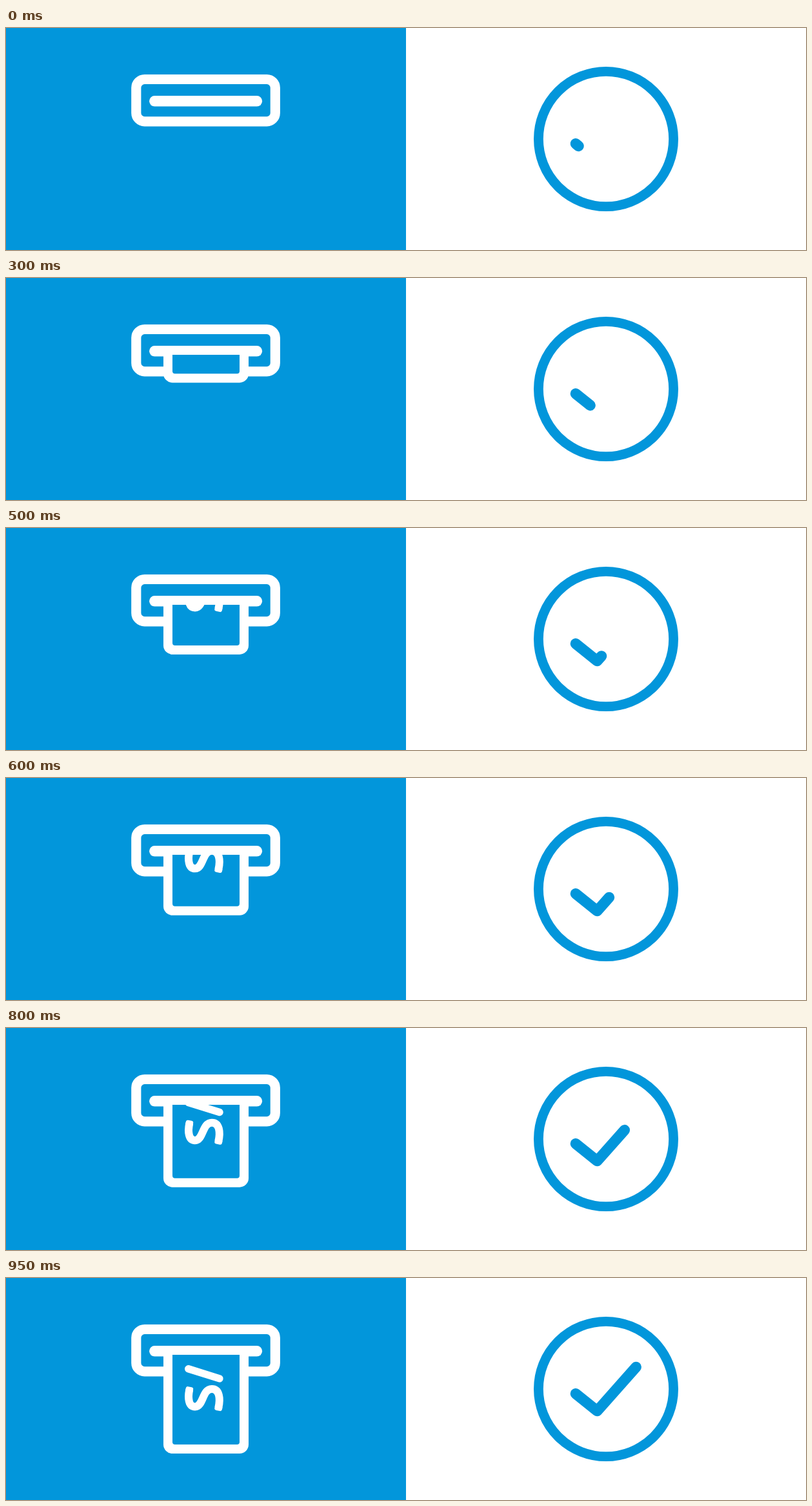
Recreate the animation shown at these times as an HTML page. Size 1240x344 px, loop 1750 ms.

```html
<!DOCTYPE html>
<html lang="en">
<head>
<meta charset="utf-8">
<title>Cash and check</title>
<style>
  html, body { margin: 0; width: 100%; height: 100%; overflow: hidden; background: #fff; }
  svg { display: block; width: 100%; height: 100%; }
  .line { fill: none; stroke-linecap: round; stroke-linejoin: round; }
  .white { stroke: #fff; }
  .blue { stroke: #0296db; }
</style>
</head>
<body>
<svg viewBox="0 0 1240 344">
  <defs>
    <clipPath id="slot"><rect x="200" y="119" width="220" height="225"/></clipPath>
  </defs>
  <rect width="620" height="344" fill="#0296db"/>

  <rect class="line white" x="201.8" y="79.5" width="215.5" height="65.3" rx="13" stroke-width="15.2"/>
  <path class="line white" d="M230.4 113.3H388.8" stroke-width="16.6"/>

  <!-- banknote, drawn fully dispensed -->
  <g clip-path="url(#slot)">
    <g id="note">
      <rect x="244" y="-60" width="132" height="332" rx="14" fill="#fff"/>
      <rect x="258" y="-60" width="104" height="318" rx="4" fill="#0296db"/>
      <path class="line white" d="M282.7 140.8L331 155.9" stroke-width="11.4"/>
      <path class="line white" style="stroke-linecap:butt" stroke-width="12"
        d="M284.3 173C281.5 186 283 199.5 293 199.5C306 199.5 304 172 319 172C331 172 332.5 187 329.3 201"/>
      <rect x="278.5" y="168.6" width="11.6" height="8" rx="3" fill="#fff" transform="rotate(10 284.3 172.6)"/>
      <rect x="323.4" y="197.6" width="11.8" height="8" rx="3" fill="#fff" transform="rotate(12 329.3 201.6)"/>
    </g>
  </g>

  <circle class="line blue" cx="930" cy="172" r="104.6" stroke-width="14.8"/>
  <path id="check" class="line blue" stroke-width="16.6"/>
</svg>
<script>
  const LOOP = 1750, STEP = 50, END = 950;
  const NOTE_SPEED = 0.169;
  const START = [883, 179.3], CORNER = [916.3, 206], TIP = [976.6, 138];
  // [time, x of the moving end of the check]
  const CHECK_KEYS = [[0, 887.5], [400, 911.5], [450, 917], [END, TIP[0]]];

  const note = document.getElementById('note');
  const check = document.getElementById('check');

  function keyed(keys, t) {
    const i = Math.max(1, keys.findIndex(key => key[0] >= t));
    const [t0, v0] = keys[i - 1], [t1, v1] = keys[i];
    return v0 + (v1 - v0) * (t - t0) / (t1 - t0);
  }

  function pointAt(x, [x0, y0], [x1, y1]) {
    return [x, y0 + (y1 - y0) * (x - x0) / (x1 - x0)];
  }

  function checkPoints(x) {
    return x <= CORNER[0]
      ? [START, pointAt(x, START, CORNER)]
      : [START, CORNER, pointAt(x, CORNER, TIP)];
  }

  function draw(ms) {
    const t = Math.min(END, Math.floor(ms % LOOP / STEP) * STEP);
    note.setAttribute('transform', `translate(0 ${(t - END) * NOTE_SPEED})`);
    check.setAttribute('d', 'M' + checkPoints(keyed(CHECK_KEYS, t)).join('L'));
  }

  let begin = null;
  function tick(now) {
    begin ??= now;
    draw(now - begin);
    requestAnimationFrame(tick);
  }
  draw(0);
  requestAnimationFrame(tick);
</script>
</body>
</html>
```
